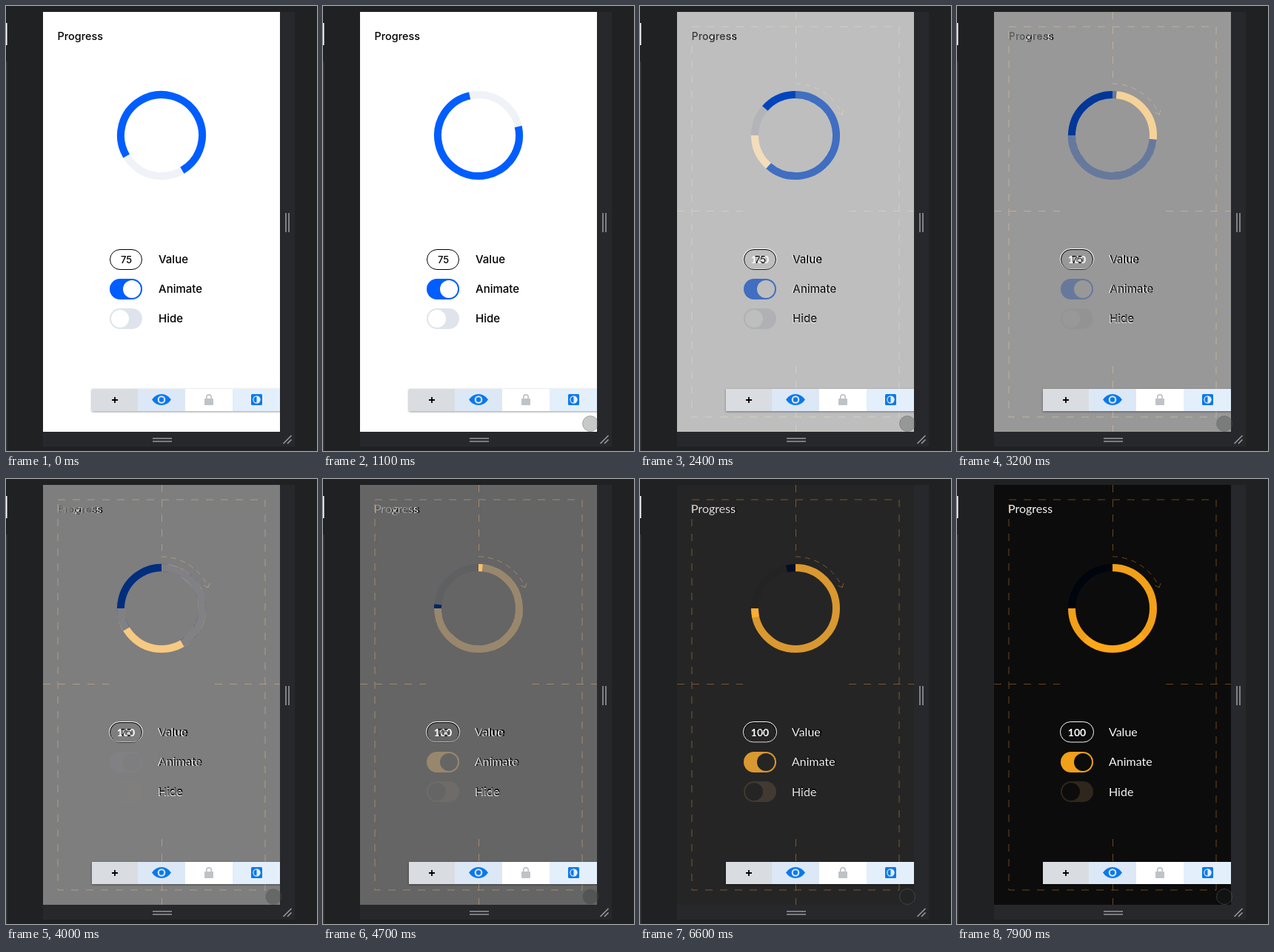
Recreate the animation shown at these times as an HTML page. Size 420 by 602 pixels, loop 8000 ms.

```html
<!DOCTYPE html>
<html>
<head>
<meta charset="utf-8">
<style>
  html, body { margin: 0; width: 100%; height: 100%; overflow: hidden; background: #202122; }
  svg { display: block; }
  .light { font: 500 15px Inter, sans-serif; }
  .dark { font: 16px Lato, sans-serif; fill: #fff; }
  .mid { text-anchor: middle; }
  .guide { fill: none; stroke: #653a0c; stroke-dasharray: 10 10; }
  .ring { fill: none; stroke-width: 10; }
  .grip { fill: none; stroke: #96989b; stroke-width: 1.6; }
</style>
</head>
<body>
<svg width="420" height="602" viewBox="0 0 420 602">
  <!-- device frame -->
  <path d="M0 75h1.5v527H0z" fill="#38393b"/>
  <path d="M0 23h1.5v30H0z" fill="#fff"/>
  <path d="M50 8h340v588H50z" fill="#27282c"/>
  <path class="grip" d="M378 280v26M382 280v26M198 585h26M198 589h26M374.500 592l11-11M380 592l5.500-5.500"/>

  <!-- light page -->
  <g class="light">
    <path d="M50 8h320v568H50z" fill="#fff"/>
    <text x="69.500" y="46" font-size="14.400">Progress</text>
    <circle class="ring" cx="210" cy="175" r="55" stroke="#eff2f7"/>
    <circle class="ring" id="spin" cx="210" cy="175" r="55" stroke="#005dff" pathLength="360" stroke-dasharray="270 90"/>
    <rect x="140.500" y="329.500" width="43" height="27" rx="13.500" fill="none" stroke="#000"/>
    <text class="mid" x="162.500" y="348" font-size="13">75</text>
    <rect x="140" y="369" width="44" height="28" rx="14" fill="#005dff"/>
    <circle cx="170" cy="383" r="12" fill="#fff"/>
    <rect x="140" y="409" width="44" height="28" rx="14" fill="#dfe4ec"/>
    <circle cx="154" cy="423" r="12" fill="#fff"/>
    <text x="206" y="348">Value</text>
    <text x="206" y="388">Animate</text>
    <text x="206" y="428">Hide</text>
  </g>

  <!-- dark layout fading in on top -->
  <g class="dark" id="overlay">
    <path d="M50 8h320v568H50z" fill="#000"/>
    <path class="guide" d="M70 28H350V556H70zM210.500 8V97M210.500 487V576M50 277.500H139M282 277.500H370"/>
    <path class="guide" d="M210 105A70 70 0 0 1 273 146" style="stroke-dasharray:7 6"/>
    <path class="guide" d="M267.500 144L273 147L275 141" style="stroke-dasharray:none"/>
    <text x="69" y="46">Progress</text>
    <path class="ring" d="M210 120A55 55 0 1 1 155 175" stroke="#ffa30d"/>
    <rect x="139.500" y="328.500" width="45" height="27.500" rx="13.750" fill="none" stroke="#fff"/>
    <text class="mid" x="162" y="348" font-size="14" font-weight="700">100</text>
    <rect x="140" y="369" width="44" height="28" rx="14" fill="#ffa30d"/>
    <circle cx="170" cy="383" r="12" fill="#000"/>
    <rect x="140" y="409" width="44" height="28" rx="14" fill="#261c12"/>
    <circle cx="154" cy="423" r="12" fill="#000"/>
    <text x="205" y="348">Value</text>
    <text x="205" y="388">Animate</text>
    <text x="205" y="429">Hide</text>
  </g>

  <!-- toolbar -->
  <defs>
    <clipPath id="page"><path d="M50 8h320v568H50z"/></clipPath>
    <filter id="shadow"><feDropShadow dx="0" dy="1" stdDeviation="1.500" flood-opacity=".4"/></filter>
  </defs>
  <g clip-path="url(#page)">
    <path d="M116 518h260v30H116z" fill="#fff" filter="url(#shadow)"/>
    <path d="M116 518h62v30h-62z" fill="#d9dde2"/>
    <path d="M178 518h64v30h-64z" fill="#dce8f6"/>
    <path d="M306 518h64v30h-64z" fill="#e4effc"/>
    <path d="M143 533h8M147 529v8" stroke="#000" stroke-width="1.800"/>
    <g fill="#0b79ec">
      <path d="M197 532.500Q202 525 210 525T223 532.500Q218 540 210 540T197 532.500z"/>
      <circle cx="210" cy="532.500" r="5.300" fill="#dce8f6"/>
      <circle cx="210" cy="532.500" r="3.200"/>
      <rect x="331" y="525" width="15" height="15" rx="1.500"/>
      <circle cx="338.500" cy="532.500" r="5.200" fill="#e4effc"/>
      <path d="M338.500 528.500a4 4 0 0 0 0 8z"/>
    </g>
    <rect x="268" y="531" width="12" height="9" rx="1" fill="#bfc3c8"/>
    <path d="M270.800 531v-2a3.200 3.200 0 0 1 6.400 0v2" fill="none" stroke="#bfc3c8" stroke-width="1.700"/>
  </g>

  <circle id="touch" r="10.500" fill="rgba(30,40,35,.25)" stroke="rgba(100,100,100,.45)"/>
</svg>
<script>
  const LOOP = 8000, STEP = 100;
  const [spin, overlay, touch] = ['spin', 'overlay', 'touch'].map(id => document.getElementById(id));
  // [time, opacity]
  const fade = [[0, 0], [1200, 0], [1800, .1], [3200, .4], [4700, .6], [5700, .7], [7200, .95], [LOOP, .95]];

  function sample(keys, t) {
    const i = keys.findIndex(k => k[0] > t);
    const [t0, a] = keys[i - 1], [t1, b] = keys[i];
    return a + (b - a) * (t - t0) / (t1 - t0);
  }

  function draw(now) {
    const t = Math.floor(now % LOOP / STEP) * STEP;
    spin.setAttribute('transform', `rotate(${149.5 + t * .18} 210 175)`);
    overlay.setAttribute('opacity', Math.round(sample(fade, t) * 20) / 20);
    const away = (1 - Math.min(t / 900, 1)) ** 2;
    touch.setAttribute('cx', 361 + 15 * away);
    touch.setAttribute('cy', 565 + 50 * away);
  }

  const start = performance.now();
  (function tick() {
    draw(performance.now() - start);
    requestAnimationFrame(tick);
  })();
</script>
</body>
</html>
```
